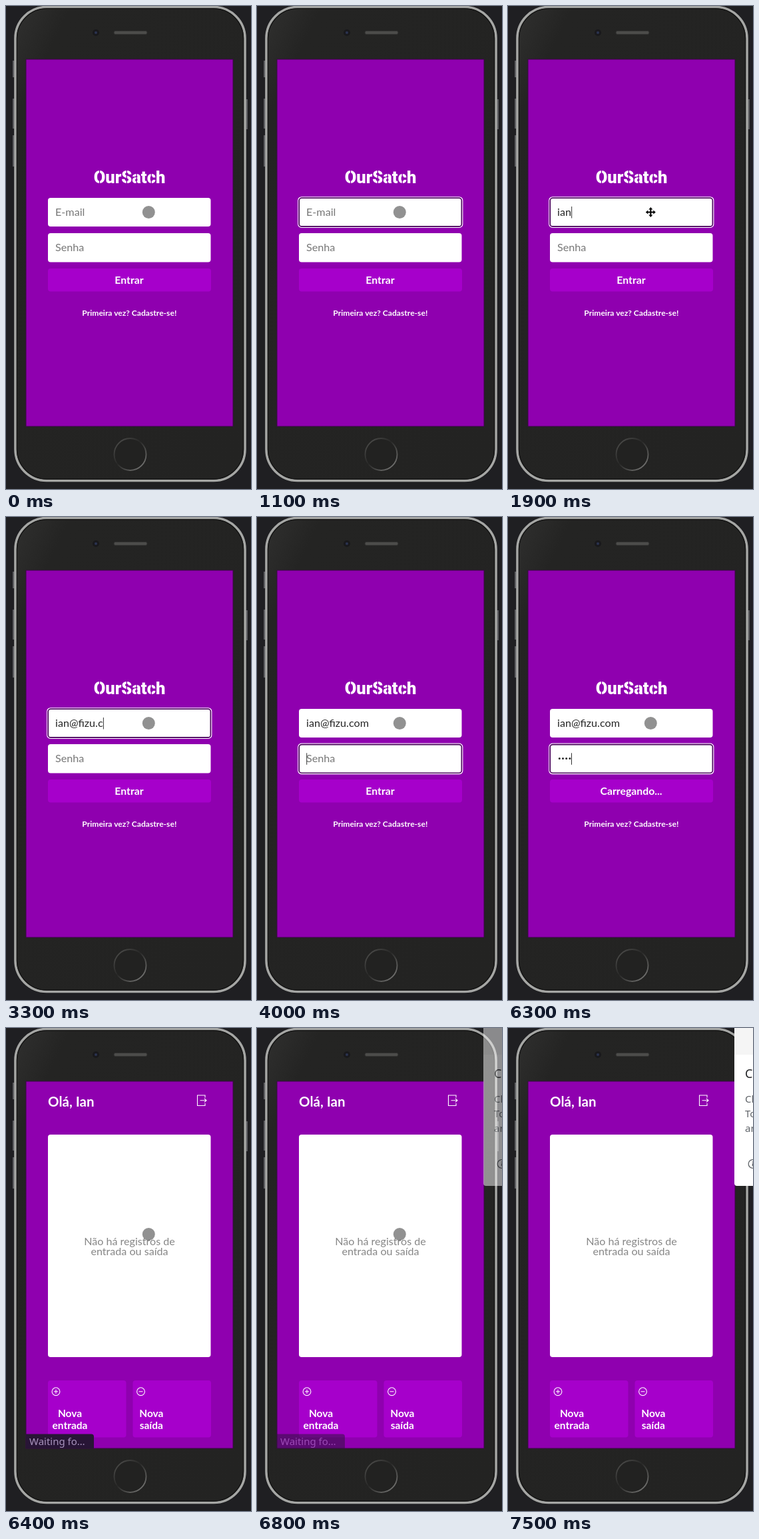
An HTML page that plays this animation: 368 px wide and 725 px high, repeating every 8000 ms.

```html
<!DOCTYPE html>
<html lang="pt">
<head>
<meta charset="utf-8">
<title>Login</title>
<style>
  html, body { margin: 0; width: 100%; height: 100%; overflow: hidden; background: #1f1f22; }
  svg { display: block; width: 368px; height: 725px; font-family: Lato, "Open Sans", sans-serif; }
  .bold { font-weight: 700; fill: #fff; }
  .mid { text-anchor: middle; }
  .field { font-size: 16.2px; fill: #262626; }
  .hint { fill: #777; }
  .title { font: 900 25.5px Roboto, sans-serif; }
  .ui { font-family: "Noto Sans", "Open Sans", sans-serif; }
  .line { fill: none; stroke: #fff; stroke-width: 1.1; }
</style>
</head>
<body>
<svg viewBox="0 0 368 725" xmlns="http://www.w3.org/2000/svg">
  <defs>
    <linearGradient id="case" x2="1" y2="1">
      <stop offset="0" stop-color="#30302f"/>
      <stop offset=".12" stop-color="#242423"/>
      <stop offset="1" stop-color="#232322"/>
    </linearGradient>
    <linearGradient id="rim" x2="1" y2="1">
      <stop offset="0" stop-color="#555553"/>
      <stop offset=".45" stop-color="#282827"/>
      <stop offset="1" stop-color="#858583"/>
    </linearGradient>
  </defs>

  <rect width="368" height="725" fill="#1f1f22"/>
  <g id="phone">
    <path d="M11.5 82v25M11.5 139v45M11.5 194v47M361.5 140v45" stroke="#5c5d60" stroke-width="3"/>
    <rect x="14" y="1.5" width="345" height="711" rx="47" fill="url(#case)" stroke="#a5a6a4" stroke-width="3.6"/>
    <rect x="16.4" y="3.9" width="340.2" height="706.2" rx="45" fill="none" stroke="#141414" stroke-width="1.2"/>
    <circle cx="135" cy="40" r="5" fill="#19191c"/>
    <circle cx="135" cy="40" r="2" fill="#2b3350"/>
    <rect x="162" y="37.5" width="50" height="5" rx="2.5" fill="#4c4c4a" stroke="#323231"/>
    <circle cx="186.5" cy="673" r="24" fill="#222221" stroke="url(#rim)" stroke-width="1.8"/>
    <rect x="30" y="80" width="311" height="551" fill="#8f00af" stroke="#3c0749"/>
  </g>

  <g id="login">
    <text id="brand" class="bold mid title" x="185.5" y="266">OurSatch</text>
    <g id="slits" stroke="#8f00af" stroke-width="1.3"></g>
    <g fill="#fff">
      <rect x="63" y="288" width="244.5" height="43" rx="4"/>
      <rect x="63" y="341" width="244.5" height="43.5" rx="4"/>
    </g>
    <g id="ring" fill="none">
      <rect x="61.8" y="286.8" width="247" height="45.6" rx="5" stroke="#fff" stroke-width="1.2"/>
      <rect x="63.3" y="288.3" width="244" height="42.6" rx="4" stroke="#4b0b5c" stroke-width="1.6"/>
    </g>
    <text id="email" class="field" x="74" y="315"></text>
    <text id="hint" class="field hint" x="74" y="368">Senha</text>
    <g id="dots" fill="#262626"></g>
    <rect id="caret" width="1" height="17.5" fill="#333"/>
    <rect x="63" y="394" width="245" height="34.5" rx="4" fill="#a600cb"/>
    <text id="submit" class="bold mid" x="185" y="417" font-size="15.8"></text>
    <text class="bold mid" x="185.3" y="465" font-size="12.1">Primeira vez? Cadastre-se!</text>
  </g>

  <g id="home">
    <text class="bold" x="63" y="118" font-size="20.5">Olá, Ian</text>
    <path class="line" stroke-width="1.3" d="M299 104.500V101H287.500V116.500H299V113M291.500 108.700H301M298 106l3 2.700-3 2.700"/>
    <rect x="63" y="160" width="244.500" height="334" rx="4" fill="#fff"/>
    <g class="mid" font-size="16.1" fill="#868686">
      <text x="185.5" y="325.500">Não há registros de</text>
      <text x="185.5" y="340.500">entrada ou saída</text>
    </g>
    <g fill="#a600cb">
      <rect x="63" y="529" width="117.500" height="85.500" rx="4"/>
      <rect x="190.500" y="529" width="117.500" height="85.500" rx="4"/>
    </g>
    <g class="line">
      <circle cx="75" cy="545.700" r="5.900"/>
      <circle cx="202.500" cy="545.700" r="5.900"/>
      <path d="M72 545.700h6M75 542.700v6M199.500 545.700h6"/>
    </g>
    <g class="bold mid" font-size="15.500">
      <text x="96" y="584">Nova</text>
      <text x="96" y="602">entrada</text>
      <text x="218.300" y="584">Nova</text>
      <text x="218.300" y="602">saída</text>
    </g>
    <g id="status">
      <path d="M30 631V609.500H128a4 4 0 0 1 4 4V631Z" fill="#281536"/>
      <text class="ui" x="35" y="626" font-size="15" fill="#a894bd">Waiting fo…</text>
    </g>
  </g>

  <g id="pointer">
    <circle id="touch" r="9.500" fill="#000" fill-opacity=".43"/>
    <path id="move" d="M0-7.500 3-4H1V-1H4V-3L7.500 0 4 3V1H1V4H3L0 7.500-3 4H-1V1H-4V3L-7.500 0-4-3V-1H-1V-4H-3Z"/>
  </g>

  <g id="popup" class="ui">
    <path d="M340 0H368V237H344a4 4 0 0 1-4-4Z" fill="#fff"/>
    <rect x="340" width="28" height="40" fill="#f5f5f5"/>
    <text x="356" y="75" font-size="18" fill="#202124">Check</text>
    <g font-size="15" fill="#5f6368">
      <text x="356" y="112">Check</text>
      <text x="356" y="134">To</text>
      <text x="356" y="156">and</text>
    </g>
    <circle cx="367.500" cy="204" r="6.300" fill="none" stroke="#5f6368" stroke-width="1.300"/>
    <path d="M367.500 200.500v1.500M367.500 203v4.500" stroke="#5f6368" stroke-width="1.500"/>
  </g>
</svg>
<script>
const LOOP = 8000;
const EMAIL = 'ian@fizu.com';
const emailKeys = [1400, 1600, 1700, 2100, 2500, 2700, 2900, 3000, 3200, 3300, 3500, 3700];
const passwordKeys = [4700, 4900, 5000, 5300];
const caretOff = [[0, 500], [1100, 1400], [4400, 4700], [5800, 6300]];
const FIELD_GAP = 53.3;
const DOT_GAP = 5.2;

const $ = id => document.getElementById(id);
const show = (id, on) => $(id).setAttribute('visibility', on ? 'inherit' : 'hidden');
const attr = (node, values) => {
  for (const key in values) node.setAttribute(key, values[key]);
};
const add = (parent, tag, values) => {
  const node = document.createElementNS('http://www.w3.org/2000/svg', tag);
  attr(node, values);
  return parent.appendChild(node);
};
const countBefore = (times, t) => times.filter(k => t >= k).length;
const within = (t, [from, to]) => t >= from && t < to;

const dots = passwordKeys.map((_, i) =>
  add($('dots'), 'circle', { cx: 77.3 + i * DOT_GAP, cy: 362.5, r: 1.5 }));

// Stencil cuts through the round letters of the title.
for (const i of [0, 3, 4, 6]) {
  const box = $('brand').getExtentOfChar(i);
  const x = box.x + box.width / 2;
  add($('slits'), 'line', { x1: x, x2: x, y1: 246, y2: 268 });
}

function drawLogin(t) {
  const typed = countBefore(emailKeys, t);
  const secret = countBefore(passwordKeys, t);
  const onPassword = t >= 4000;
  const email = $('email');

  email.textContent = typed ? EMAIL.slice(0, typed) : 'E-mail';
  email.classList.toggle('hint', !typed);
  show('hint', !secret);
  dots.forEach((dot, i) => attr(dot, { visibility: i < secret ? 'inherit' : 'hidden' }));

  show('ring', t >= 500);
  attr($('ring'), { transform: `translate(0 ${onPassword ? FIELD_GAP : 0})` });

  const advance = onPassword ? secret * DOT_GAP : typed ? email.getComputedTextLength() : 0;
  show('caret', !caretOff.some(span => within(t, span)));
  attr($('caret'), { x: 74.2 + advance, y: onPassword ? 354.3 : 301 });

  $('submit').textContent = t >= 5700 ? 'Carregando...' : 'Entrar';
}

function drawHome(t) {
  show('status', t < 6900);
  attr($('status'), { opacity: t >= 6800 ? 0.5 : 1 });
  show('popup', t >= 6800);
  attr($('popup'), { opacity: t < 6900 ? 0.5 : 1 });
}

function drawPointer(t) {
  const [x, y] = t < 7300 ? [214.3, 309.5] : t < 7400 ? [226, 311] : [251, 308];
  const moving = within(t, [1900, 2300]);
  show('pointer', t < 7500);
  show('touch', !moving);
  show('move', moving);
  attr($('pointer'), { transform: `translate(${x} ${y})` });
}

function render(t) {
  const loggedIn = t >= 6400;
  attr($('login'), { display: loggedIn ? 'none' : 'inline' });
  attr($('home'), { display: loggedIn ? 'inline' : 'none' });
  if (!loggedIn) drawLogin(t);
  drawHome(t);
  drawPointer(t);
}

function tick() {
  render(performance.now() % LOOP);
  requestAnimationFrame(tick);
}
tick();
</script>
</body>
</html>
```
